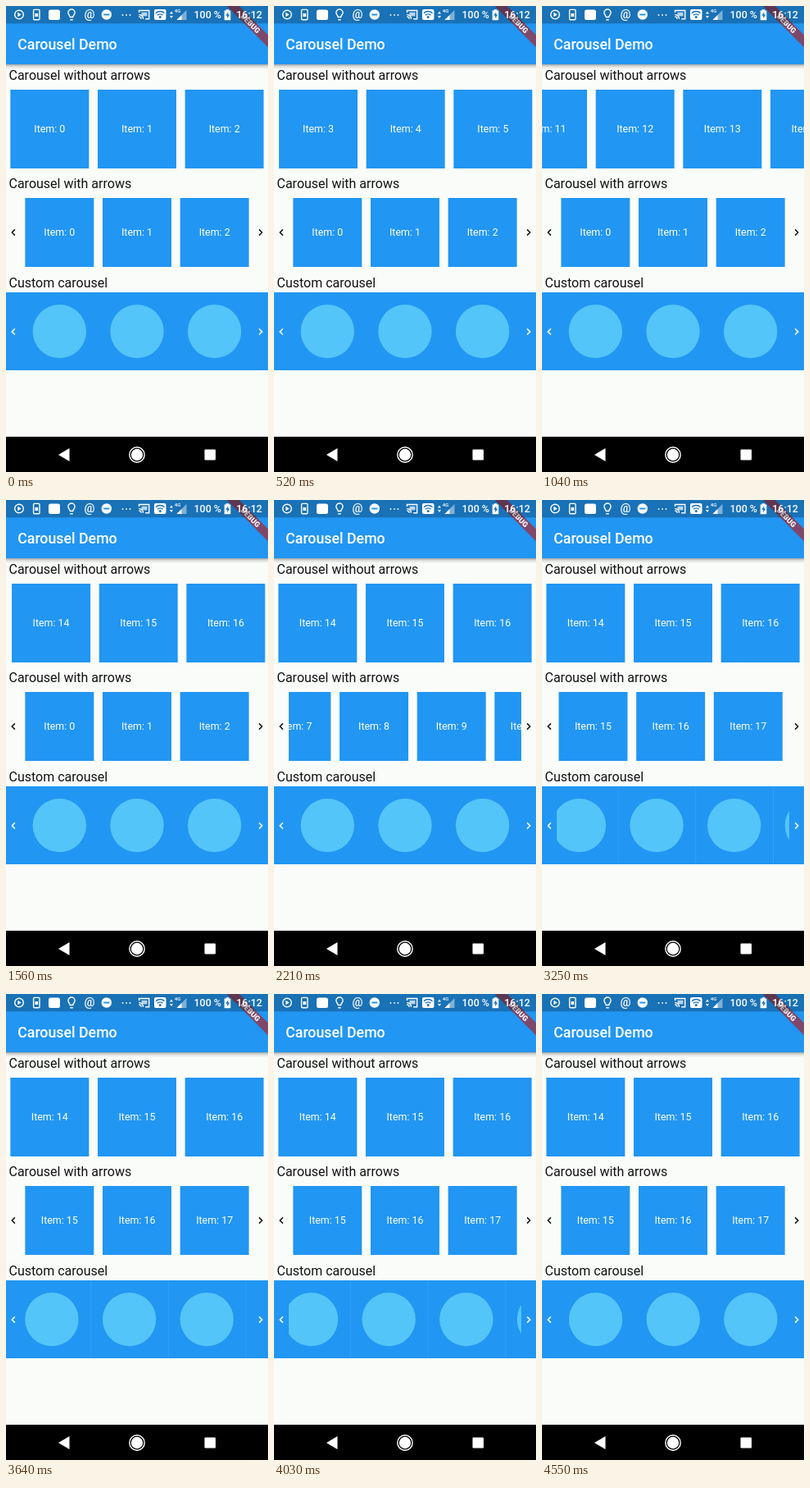
Write an HTML page that moves like this. It is 320 by 568 pixels and loops after 4680 ms.

```html
<!DOCTYPE html>
<html lang="en">
<head>
<meta charset="utf-8">
<title>Carousel Demo</title>
<style>
  html, body { margin: 0; width: 100%; height: 100%; overflow: hidden; background: #fafcfa; }
  svg { display: block; width: 320px; height: 568px; font-family: Roboto, sans-serif; }
  .blue { fill: #2196f3; }
  .head { font-size: 16px; fill: #111; }
  .label { font-size: 12.44px; fill: #fff; text-anchor: middle; }
  .line { fill: none; stroke: #fff; stroke-width: 1.4; }
  .seam { fill: #fff; opacity: .09; }
</style>
</head>
<body>
<svg viewBox="0 0 320 568">
  <defs>
    <linearGradient id="shade" x2="0" y2="1">
      <stop offset="0" stop-color="#000" stop-opacity=".36"/>
      <stop offset=".4" stop-color="#000" stop-opacity=".14"/>
      <stop offset="1" stop-color="#000" stop-opacity="0"/>
    </linearGradient>
    <clipPath id="inner"><rect x="18" y="230" width="284" height="220"/></clipPath>
    <path id="prev" d="M10.9 -3.6L7.3 0l3.6 3.6" fill="none" stroke-width="1.5"/>
  </defs>
  <rect width="320" height="568" fill="#fafcfa"/>

  <g class="head">
    <text x="3.5" y="90">Carousel without arrows</text>
    <text x="3.5" y="222">Carousel with arrows</text>
    <text x="3.5" y="342.5">Custom carousel</text>
  </g>

  <g id="plain"></g>
  <g clip-path="url(#inner)"><g id="arrows"></g></g>
  <rect class="blue" y="349" width="320" height="95"/>
  <g clip-path="url(#inner)"><g id="custom"></g></g>

  <g stroke="#111">
    <use href="#prev" y="276"/>
    <use href="#prev" transform="translate(320 276) scale(-1 1)"/>
  </g>
  <g stroke="#fff">
    <use href="#prev" y="397"/>
    <use href="#prev" transform="translate(320 397) scale(-1 1)"/>
  </g>

  <rect y="71" width="320" height="6" fill="url(#shade)"/>
  <rect class="blue" width="320" height="71"/>
  <text x="14.2" y="53" font-size="17.78" font-weight="500" fill="#fff">Carousel Demo</text>

  <g transform="translate(320) rotate(45)">
    <rect x="-35.56" y="24.9" width="71.1" height="10.67" fill="#b71c1c" fill-opacity=".63"/>
    <text y="33.4" font-size="9.07" font-weight="900" fill="#fff" text-anchor="middle">DEBUG</text>
  </g>
  <rect width="320" height="21.3" fill="#000" fill-opacity=".25"/>

  <g id="status" fill="#fff">
    <circle class="line" cx="16" cy="10.5" r="5.3"/>
    <path d="M14.3 7.8l4.4 2.7-4.4 2.7z"/>
    <rect class="line" x="33.6" y="4.4" width="7.4" height="12.4" rx="1.2"/>
    <path d="M35.5 9h3.6v4h-3.6z"/>
    <rect x="52" y="4.5" width="14" height="12.5" rx="2.5"/>
    <path class="line" stroke-width="1.2" d="M78.3 13.5c0-2-2.4-2.6-2.4-5.4a4.1 4.1 0 0 1 8.2 0c0 2.800-2.400 3.400-2.400 5.400zM78.300 16.800h3.400"/>
    <text x="102" y="15" font-size="14.5" font-weight="500" text-anchor="middle">@</text>
    <circle cx="122.800" cy="10.500" r="6.200"/>
    <rect class="blue" x="119.300" y="9.500" width="7" height="2"/>
    <circle cx="142.500" cy="11" r=".9"/>
    <circle cx="147" cy="11" r=".9"/>
    <circle cx="151.500" cy="11" r=".9"/>
    <path class="line" d="M162.500 8V5.500h12.200v10.300h-4.500M162.300 10.500a5.300 5.300 0 0 1 5.300 5.300M162.300 13a2.800 2.800 0 0 1 2.800 2.800"/>
    <rect x="165.500" y="7.800" width="7" height="4.500" opacity=".7"/>
    <rect x="181" y="4" width="14.500" height="13" rx="2"/>
    <path fill="none" stroke="#1971b6" stroke-width="1.500" d="M183 8.700a7.600 7.600 0 0 1 10.500 0M185 11.200a4.700 4.700 0 0 1 6.500 0"/>
    <circle cx="188.250" cy="13.600" r="1.500" fill="#1971b6"/>
    <path d="M200 9.500l2-3 2 3zM200 12l2 3 2-3z"/>
    <text x="205.800" y="8.300" font-size="6.200" font-weight="500">4G</text>
    <path d="M220.500 5v12h-12z" opacity=".45"/>
    <path d="M214.500 11v6h-6z"/>
    <text x="229.500" y="15.300" font-size="12.440" font-weight="500">100 %</text>
    <path d="M266.700 5.600h2v-1.400h3.600v1.400h2v11.600h-7.600z"/>
    <path fill="#1971b6" d="M271.300 7.200l-3 4.500h1.900v3.500l3-4.700h-1.900z"/>
    <text x="281.300" y="15.300" font-size="12.440" font-weight="500">16:12</text>
  </g>

  <rect y="525" width="320" height="43"/>
  <g fill="#fff">
    <path d="M64 547l13.500-8v16z"/>
    <circle cx="160" cy="547" r="7.200"/>
    <circle class="line" cx="160" cy="547" r="9.200"/>
    <rect x="242.500" y="540.500" width="13.500" height="13" rx="1"/>
  </g>
</svg>
<script>
  const LOOP = 4680, STEP = 130;
  const WIDE = 320 / 3, SLIM = 284 / 3;
  const $ = id => document.getElementById(id);

  const fill = (id, count, item) => {
    $(id).innerHTML = Array.from({ length: count }, (_, i) => item(i)).join('');
  };
  const card = (x, y, size, i) =>
    `<rect class="blue" x="${x}" y="${y}" width="${size}" height="${size}"/>
     <text class="label" x="${x + size / 2}" y="${y + size / 2 + 4.4}">Item: ${i}</text>`;

  fill('plain', 18, i => card(5.33 + WIDE * i, 102, 96, i));
  fill('arrows', 20, i => card(23.33 + SLIM * i, 234, 84, i));
  fill('custom', 12, i => {
    const x = 18 + SLIM * i;
    return `<rect class="seam" x="${x}" y="349" width="1" height="95"/>
      <circle cx="${x + SLIM / 2}" cy="396.6" r="32.7" fill="#54c5f8"/>`;
  });

  // Each fling: [start ms, distance px, decay ms]
  const flings = {
    plain: [[0, 3 * WIDE, 85], [600, 5 * WIDE, 100], [950, 6 * WIDE, 103]],
    arrows: [[1820, 8 * SLIM, 150.5], [2500, 7 * SLIM + 3.3, 100], [3300, -3.3, 60]],
    custom: [[3000, 20, 40], [3260, 5 * SLIM, 100], [4030, SLIM - 20, 90]]
  };
  const offset = (list, t) => list.reduce((sum, [start, dist, decay]) =>
    sum + (t > start ? dist * (1 - Math.exp((start - t) / decay)) : 0), 0);

  const seams = document.querySelectorAll('.seam');
  const begin = performance.now();

  function draw(now) {
    const time = Math.max(0, now - begin) % LOOP;
    const t = Math.floor(time / STEP) * STEP;
    for (const id in flings)
      $(id).setAttribute('transform', `translate(${-offset(flings[id], t).toFixed(2)})`);
    const moving = t > 3000 && t < 4500;
    seams.forEach(s => s.setAttribute('visibility', moving ? 'visible' : 'hidden'));
    requestAnimationFrame(draw);
  }
  draw(begin);
</script>
</body>
</html>
```
